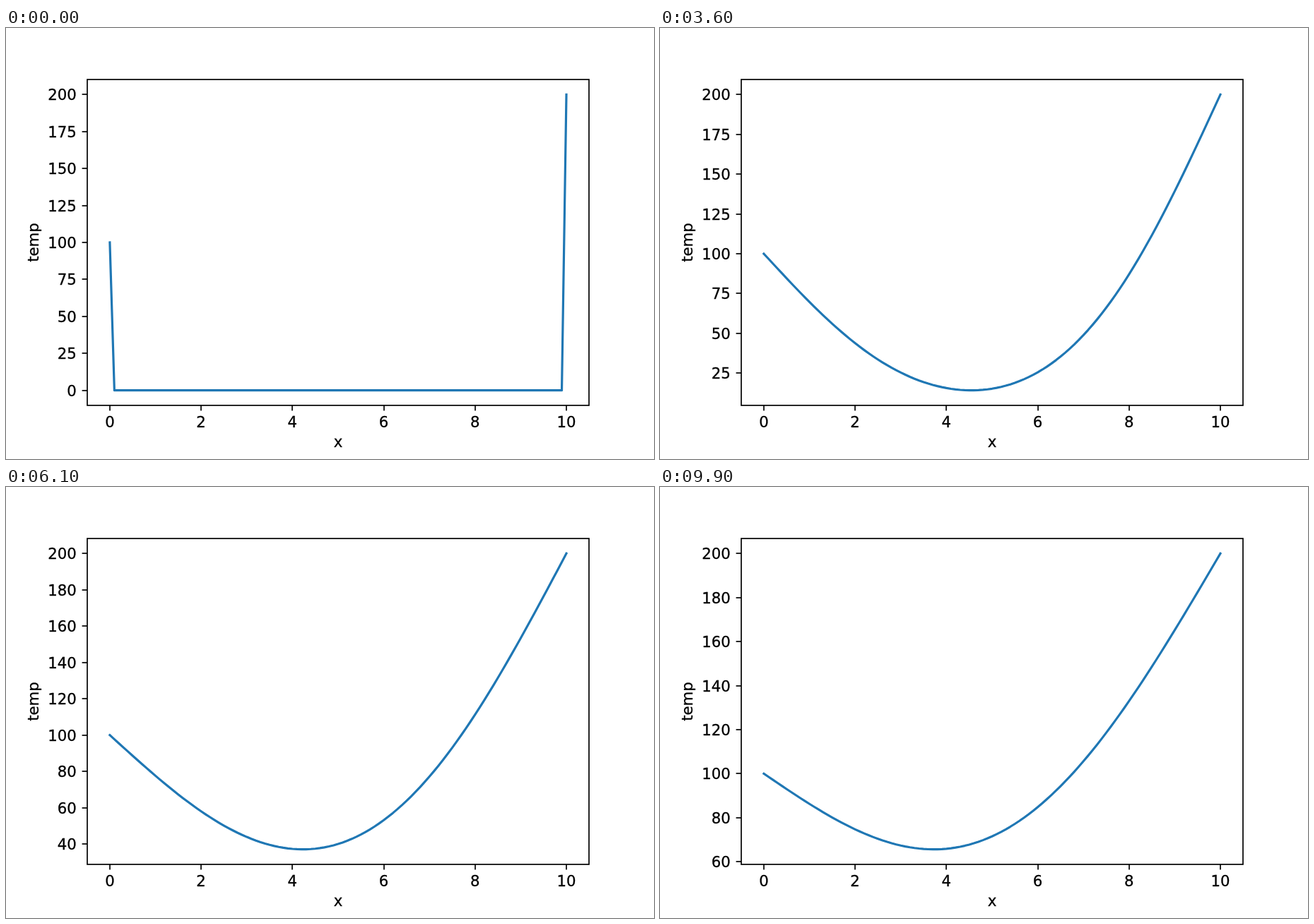
Animation, 917 px wide and 611 px high, one loop 10 s. Source, as an HTML page:

```html
<!DOCTYPE html>
<html lang="en">
<head>
<meta charset="utf-8">
<title>Heat in a rod</title>
<style>
  html, body { margin: 0; width: 100%; height: 100%; overflow: hidden; background: #fff; }
  svg { display: block; }
  text { font: 21.22px "DejaVu Sans", sans-serif; stroke: #000; stroke-width: .3px; }
  .line { fill: none; stroke: #000; stroke-width: 1.7; }
  .curve { fill: none; stroke: #1f77b4; stroke-width: 3.18; stroke-linejoin: round; stroke-linecap: square; }
  .end { text-anchor: end; }
  .mid { text-anchor: middle; }
</style>
</head>
<body>
<svg width="917" height="611" viewBox="0 0 917 611">
  <path class="curve"/>
  <rect class="line" x="115" y="73" width="710" height="462"/>
  <g id="xTicks"></g>
  <g id="yTicks"></g>
  <text class="mid" x="470" y="594">x</text>
  <text class="mid" transform="translate(46 304) rotate(-90)">temp</text>
</svg>
<script>
const LEFT = 114.6, RIGHT = 825.3, TOP = 73.3, BOTTOM = 534.6;
const FRAME = 100, FRAMES = 100;
const POINTS = 101, LENGTH = 10, HOT = 200, WARM = 100;
const SPREAD = 0.091; // diffusivity times the time per step
const TERMS = 60;

const curve = document.querySelector(".curve");
const xTicks = document.getElementById("xTicks");
const yTicks = document.getElementById("yTicks");

function add(parent, tag, attrs, content = "") {
  const node = document.createElementNS("http://www.w3.org/2000/svg", tag);
  for (const key in attrs) node.setAttribute(key, attrs[key]);
  node.textContent = content;
  parent.append(node);
}

// Fourier solution of the heat equation with fixed ends
function profile(step) {
  const amps = [];
  for (let n = 1; n <= TERMS; n++) {
    const k = n * Math.PI / LENGTH;
    const start = -2 / (n * Math.PI) * (WARM - HOT * (-1) ** n);
    amps.push(start * Math.exp(-k * k * SPREAD * step));
  }
  return Array.from({ length: POINTS }, (_, i) => {
    if (i === 0) return WARM;
    if (i === POINTS - 1) return HOT;
    if (step === 0) return 0;
    const s = i / (POINTS - 1);
    return amps.reduce((sum, a, j) => sum + a * Math.sin((j + 1) * Math.PI * s),
      WARM + (HOT - WARM) * s);
  });
}

const xPos = x => LEFT + (RIGHT - LEFT) * (x + 0.5) / 11;

function drawXTicks() {
  for (let x = 0; x <= LENGTH; x += 2) {
    add(xTicks, "path", { class: "line", d: `M${Math.round(xPos(x))} 535v7.4` });
    add(xTicks, "text", { class: "mid", x: xPos(x), y: 565.5 }, x);
  }
}

function draw(step) {
  const temps = profile(step);
  const low = Math.min(...temps);
  const margin = (HOT - low) * 0.05;
  const min = low - margin, max = HOT + margin;
  const yPos = v => BOTTOM - (BOTTOM - TOP) * (v - min) / (max - min);

  curve.setAttribute("d", "M" + temps.map((v, i) =>
    xPos(i * LENGTH / (POINTS - 1)).toFixed(2) + " " + yPos(v).toFixed(2)).join("L"));

  yTicks.textContent = "";
  const gap = (max - min) / 9 <= 20 ? 20 : 25;
  for (let v = Math.ceil(min / gap) * gap; v <= max; v += gap) {
    const y = Math.round(yPos(v));
    add(yTicks, "path", { class: "line", d: `M115 ${y}h-7.4` });
    add(yTicks, "text", { class: "end", x: 99.8, y: y + 8 }, v + 0);
  }
}

let shown = -1;
function tick() {
  const step = Math.floor(performance.now() / FRAME) % FRAMES;
  if (step !== shown) draw(shown = step);
  requestAnimationFrame(tick);
}

drawXTicks();
tick();
</script>
</body>
</html>
```
